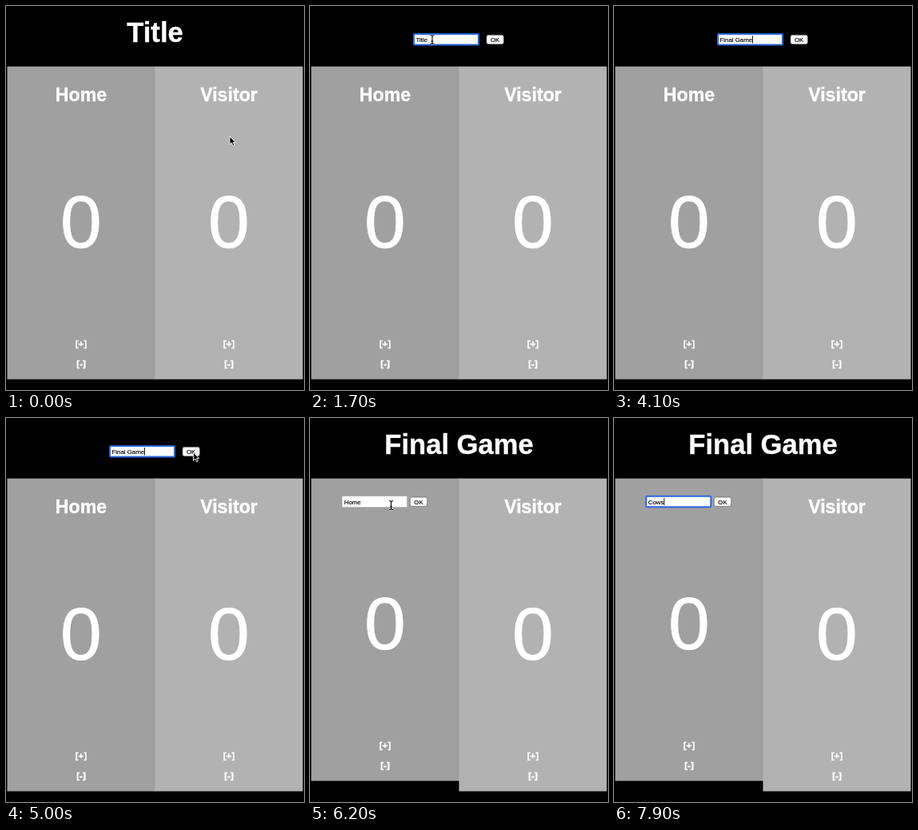
These frames come from a looping animation (373 px wide and 480 px high, 8 s). An HTML page:

```html
<!DOCTYPE html>
<html lang="en">
<head>
<meta charset="utf-8">
<title>Scoreboard</title>
<style>
  html, body { margin: 0; height: 100%; overflow: hidden; background: #000; }
  svg { display: block; width: 373px; height: 480px; }
  text { font-family: "Liberation Sans", Arial, sans-serif; fill: #fff; stroke: #fff; stroke-width: .7px; white-space: pre; }
  .mid { text-anchor: middle; }
  .bold { font-weight: bold; stroke-width: .4px; }
  .ui { fill: #000; stroke: #000; stroke-width: .15px; }
</style>
</head>
<body>
<svg id="stage" viewBox="0 0 373 480"></svg>
<script>
const LOOP = 8000, STEP = 100, UI = 7.85;
const stage = document.getElementById('stage');
const pen = document.createElement('canvas').getContext('2d');
pen.font = UI + 'px "Liberation Sans", Arial, sans-serif';

// Pointer stops: time, x, y
const path = [
  [100, 280, 163], [600, 182, 31], [700, 182, 31], [1100, 216, 28], [1300, 216, 28],
  [1700, 153, 42], [2100, 74, 44], [2200, 74, 44], [2400, 99, 38], [4400, 130, 40],
  [4900, 215, 43], [5100, 254, 43], [5300, 238.4, 42.6], [5400, 238.4, 42.6],
  [6000, 101.5, 109], [6200, 101.5, 109], [6600, 67, 105], [7000, 23, 105]
];
// Typed text: time, value
const titleKeys = [[2800, 'F'], [2900, 'Fi'], [3000, 'Fin'], [3300, 'Fina'], [3400, 'Final '],
  [3600, 'Final G'], [3800, 'Final Ga'], [3900, 'Final Gam'], [4000, 'Final Game']];
const homeKeys = [[7200, 'C'], [7400, 'Co'], [7500, 'Cow'], [7700, 'Cows']];

function pointerAt(t) {
  const i = path.findIndex(p => p[0] >= t);
  if (i < 1) return (i ? path[path.length - 1] : path[0]).slice(1);
  const [t0, x0, y0] = path[i - 1], [t1, x1, y1] = path[i];
  const k = (t - t0) / (t1 - t0);
  return [x0 + (x1 - x0) * k, y0 + (y1 - y0) * k];
}

const typed = (keys, t, start) => keys.reduce((s, [at, v]) => t >= at ? v : s, start);
const rect = (x, y, w, h, fill, more = '') =>
  `<rect x="${x}" y="${y}" width="${w}" height="${h}" fill="${fill}" ${more}/>`;
const label = (s, x, y, size, cls = 'mid bold') =>
  `<text class="${cls}" x="${x}" y="${y}" font-size="${size}">${s}</text>`;

function field(x, y, keys, start, t, press, blur, px) {
  const value = typed(keys, t, start), w = pen.measureText(value).width;
  const focused = t >= press && t < blur, left = x + 2;
  let out = rect(x - .5, y - .5, 81, 13.5, '#fff',
    focused ? 'rx="1" stroke="#2b66dd" stroke-width="2"' : '');
  if (focused && t < keys[0][0]) {
    const from = Math.min(left + w, Math.max(left, px));
    out += rect(from, y + 1.8, left + w - from, 9, '#b3d7ff');
  } else if (focused) out += rect(left + w, y + 1.5, .9, 9.5, '#000');
  return out + label(value, left, y + 9.5, UI, 'ui');
}

const button = (x, y) =>
  rect(x, y, 21.4, 11.4, '#fff', 'rx="2.4" stroke="#666" stroke-width=".7"') +
  label('OK', x + 10.7, y + 8.5, UI, 'ui mid');

function team(x, fill, heading, up) {
  const cx = x + 92.5;
  return rect(x, 75.6, 185, 391 - up, fill) + heading +
    label(0, cx, 302.2 - up, 93.2, 'mid') +
    label('[+]', cx, 426 - up, 11.6) + label('[-]', cx, 451 - up, 11.6);
}

function pointer(t, x, y) {
  const arrow = (y > 52 && y < 97) || y > 125 || (t >= 2300 && t < 2800) ||
    (t >= 4500 && t < 5400 && x > 211);
  const d = arrow ? 'M0 0V10.2L2.4 8L4 11.8L5.8 11L4.2 7.4H7.3Z'
    : 'M-2.5 -5.5Q0 -5.5 0 -4Q0 -5.5 2.5 -5.5M0 -4V4M-2.5 5.5Q0 5.5 0 4Q0 5.5 2.5 5.5M-1.5 2H1.5';
  const draw = (fill, color, w) =>
    `<path d="${d}" fill="${fill}" stroke="${color}" stroke-width="${w}"/>`;
  return `<g transform="translate(${x} ${y})">` +
    (arrow ? draw('#000', '#fff', .9) : draw('none', '#fff', 2.2) + draw('none', '#000', 1.1)) + '</g>';
}

function render(t) {
  const [x, y] = pointerAt(t);
  const editTitle = t >= 1300 && t < 5400, editHome = t >= 6200;
  const hidden = (t >= 2800 && t < 4500) || t >= 7200;
  const up = editHome ? 13 : 0;
  const title = editTitle
    ? field(130.5, 35.5, titleKeys, 'Title', t, 1700, 5300, x) + button(221, 36.3)
    : label(t < 1300 ? 'Title' : 'Final Game', 186.5, 45, 34.6);
  const home = editHome
    ? field(40.8, 98.3, homeKeys, 'Home', t, 6600, LOOP, x) + button(125.3, 99)
    : label('Home', 94, 118.7, 23.2);
  // The strip under the seam keeps the two panels from showing black between them
  stage.innerHTML = title + rect(186, 75.6, 1, 391 - up, '#a0a0a0') +
    team(1.5, '#a0a0a0', home, up) +
    team(186.5, '#b2b2b2', label('Visitor', 279, 118.7, 23.2), 0) +
    (hidden ? '' : pointer(t, x, y));
}

let last = -1;
function tick(now) {
  const t = Math.floor(now % LOOP / STEP) * STEP;
  if (t !== last) render(last = t);
  requestAnimationFrame(tick);
}
render(0);
requestAnimationFrame(tick);
</script>
</body>
</html>
```
